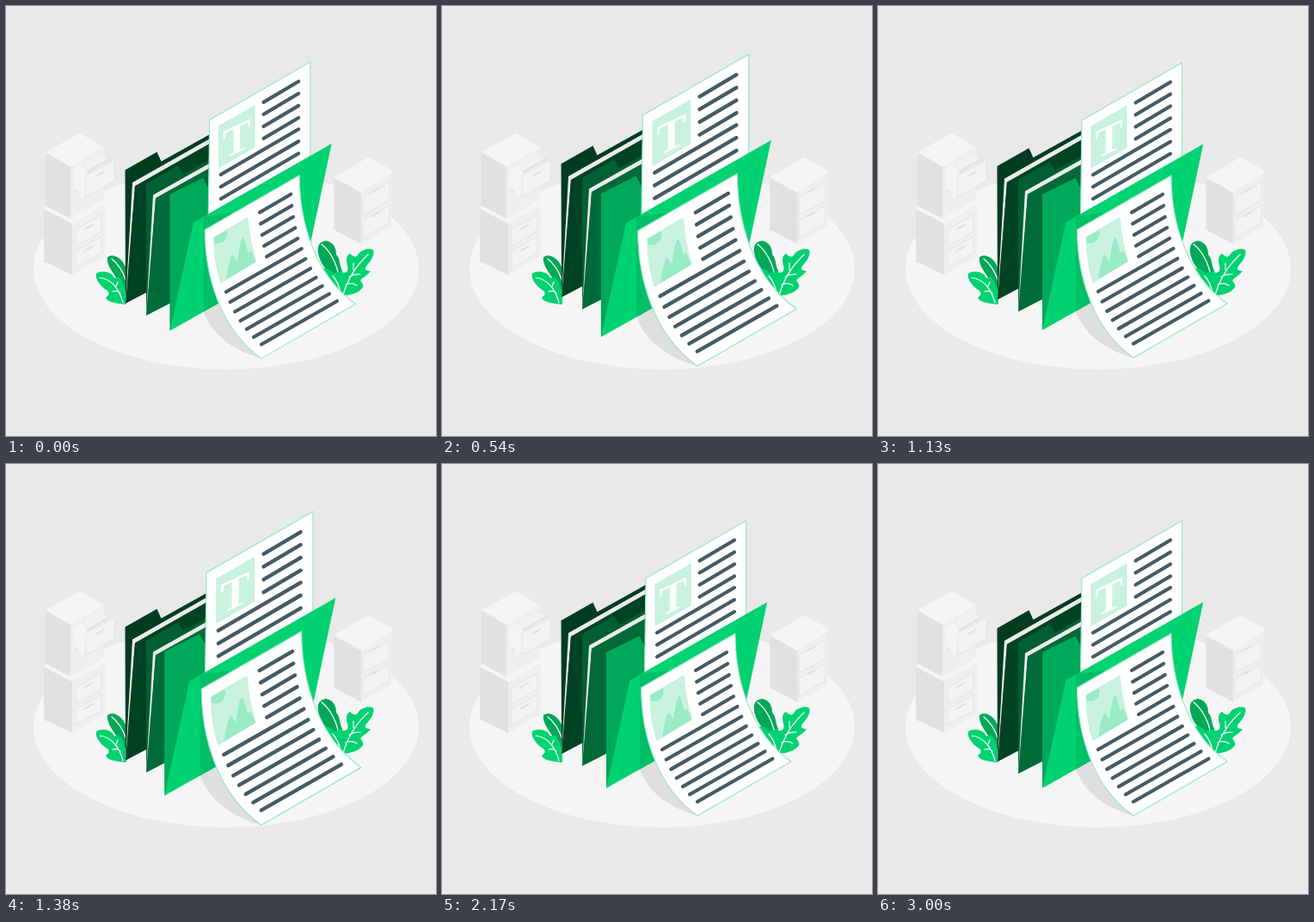
Write an HTML page that moves like this. It is 500 px wide and 500 px high and loops after 3.04 s.

```html
<!DOCTYPE html>
<html lang="en">
<head>
<meta charset="utf-8">
<title>Folders and documents</title>
<style>
  html, body { margin: 0; width: 100%; height: 100%; overflow: hidden; background: #e9e9e9; }
  svg { display: block; width: 100%; height: 100%; }
  .vein { fill: none; stroke: #fff; stroke-width: 1.2; stroke-linecap: round; }
  .rule { stroke: #455a64; stroke-width: 4.1; stroke-linecap: round; }
  .sheet { fill: #fff; stroke: #93e8c2; stroke-width: 1.1; stroke-linejoin: round; }
  .mint { fill: #caf3df; stroke: #a9ecce; stroke-width: .6; }
  .top { fill: #f4f4f4; }
  .side { fill: #e1e1e1; }
  .face { fill: #eeeeee; }
  .drawer { fill: #f2f2f2; stroke: #e3e3e3; stroke-width: 1; }
  .handle { stroke: #dedede; stroke-width: 2; }
  .glyph { font: bold 49px "Liberation Serif", "Noto Serif", serif; fill: #fff; text-anchor: middle; }
</style>
</head>
<body>
<svg viewBox="0 0 500 500">
  <rect width="500" height="500" fill="#e9e9e9"/>
  <ellipse cx="256" cy="305.5" rx="224" ry="117" fill="#f5f5f5"/>

  <g id="cabinets">
    <path class="side" d="M44 236L77 253V313L44 297Z"/>
    <path class="face" d="M77 253L115 231V291L77 313Z"/>
    <path class="top" d="M44 236L46 231L75 247L114 225L115 231L77 253Z"/>
    <path class="drawer" d="M81 260L111 243V262L81 279ZM81 285L111 268V287L81 304Z"/>
    <path class="handle" d="M91 260L101 254M91 285L101 279"/>
    <path class="side" d="M46 170L75 187V247L46 232Z"/>
    <path class="face" d="M75 187L114 164V225L75 247Z"/>
    <path class="top" d="M46 170L86 148L114 164L75 187Z"/>
    <path class="side" d="M79 192L110 174V184L93 194V222L79 214Z"/>
    <path d="M78 191L93 181V219L87 224L84 215L78 212Z" fill="#f3f3f3"/>
    <path class="side" d="M89 184L112 171L123 178L96 194Z"/>
    <path d="M90 183L111 171L120 177L94 192Z" fill="#f0f0f0"/>
    <path class="drawer" d="M93 197L126 179V203L93 222Z"/>
    <path class="handle" d="M105 198L115 192"/>

    <path class="side" d="M381 200L413 217V277L381 260Z"/>
    <path class="face" d="M413 217L448 195V257L413 277Z"/>
    <path class="top" d="M381 199L421 176L449 191L448 195L413 217Z"/>
    <path class="drawer" d="M415 222L446 205V226L415 243ZM415 249L446 232V252L415 270Z"/>
    <path class="handle" d="M425 217L434 212M425 245L434 240"/>
  </g>

  <g id="plants">
    <path fill="#00a859" d="M140 334C128 314 116 302 118 292C126 287 136 294 140 306Z"/>
    <path class="vein" d="M123 294Q134 303 139 318"/>
    <path fill="#00d272" d="M139 347C128 346 117 344 116 339C122 335 120 332 115 329C108 324 103 315 105 311C111 307 120 309 124 313C125 317 128 317 131 315C136 319 140 330 140 346Z"/>
    <path class="vein" d="M109 316C122 317 132 329 136 345M128 326L130 321M124 332Q130 330 133 334"/>
    <path fill="#00a859" d="M389 320C381 316 367 304 364 291C361 281 363 274 372 273C381 274 384 282 384 289C389 294 387 300 391 308Z"/>
    <path class="vein" d="M367 277Q383 290 388 318"/>
    <path fill="#00d272" d="M366 306C372 303 378 307 381 311C385 308 388 309 390 312L390 335L376 325Z"/>
    <path fill="#00d272" d="M385 334C383 322 384 315 389 308C395 313 399 308 397 302C395 294 396 290 400 288C404 292 408 293 410 288C414 283 424 281 427 284C429 288 425 296 420 301C416 306 418 308 424 308C420 314 414 316 412 319C414 322 416 324 415 327C410 335 396 337 388 337Z"/>
    <path class="vein" d="M421 289C409 300 398 315 392 336M404 307V299M399 315Q405 311 412 312M395 324Q402 321 408 325M380 314Q387 322 389 334"/>
  </g>

  <g id="backFolders">
    <path fill="#003c20" d="M138.500 191L175.500 170L180.500 181L245 145V290L139 346Z"/>
    <path fill="#ebebeb" d="M139 346L147 205.500L245 150V163L150 210L140 343Z"/>
    <path fill="#004224" d="M139 346L150 209.500L245 155.500V290Z"/>
    <path fill="#005f32" d="M163 207L200 185.500L206 196L245 174V318L163 360Z"/>
    <path fill="#ebebeb" d="M163 360L171 220L245 178.500V191L174 224L164.500 357Z"/>
    <path fill="#006a38" d="M163 360L174 223.500L245 184V318Z"/>
  </g>

  <g id="paperwork">
    <path d="M228 348C236 380 264 400 297 409L254 340Z" fill="#dfdfdf"/>
    <path fill="#00a85a" d="M191 219L229.500 200L235.500 211.500L270 192V331L191 376Z"/>
    <path class="sheet" d="M237 133L353.500 66V225L235 285Z"/>
    <path class="mint" d="M248 140L289 116.500V164.500L248 188Z"/>
    <text class="glyph" transform="matrix(1 -.47 0 1 268.500 171)">T</text>
    <g id="backRules"></g>
    <path fill="#00d272" d="M191 377L218.500 251.500L378.200 160.500L351.500 286.500Z"/>
    <path fill="#00bf67" d="M230 245V355L262 337V240Z"/>
    <path class="sheet" d="M231.500 260L341 197C341 250 358 312 406 346L297 409C249 375 231.500 313 231.500 260Z"/>
    <path class="mint" d="M242 269L281 246Q283 272 290.500 297L250 321.500Q242 296 242 269Z"/>
    <path fill="#98ebc5" d="M242 269L257 260.200C260 270 253 278 243 275.500ZM256.500 317.500C258 303 261 291 264 289L269 297C271 284 273 271 275.500 269C279 272 280 283 282 287L285 284L290.500 297Z"/>
    <g id="frontRules"></g>
  </g>
</svg>

<script>
  const LOOP = 3040, CYCLE = 3000, FLOAT = 1500, STEP = 1000 / 24, LEAD = 15;
  const PULSE = [[0, 0], [300, 1], [900, 0], [1200, 0], [1500, 1], [1800, 0], [3000, 0]];
  const byId = id => document.getElementById(id);
  const paperwork = byId("paperwork"), backFolders = byId("backFolders");

  const rule = (x, y, w, h) =>
    `<line class="rule" x1="${x}" y1="${y}" x2="${x + w}" y2="${y - h}"/>`;
  const rules = (n, make) => Array.from({ length: n }, (_, i) => make(i)).join("");

  byId("backRules").innerHTML =
    rules(4, i => rule(299.5, 112.5 + 14 * i, 40.5, 24)) +
    rules(4, i => rule(250, 196.3 + 14 * i, 90, 52.5));
  byId("frontRules").innerHTML =
    rules(5, i => rule(295 + .8 * i + .3 * i * i, 240 + 13.4 * i - .15 * i * i, 36, 21)) +
    rules(7, i => rule(256 + 4.3 * i + .42 * i * i, 332 + 12.1 * i - .33 * i * i, 87.5, 50));

  function track(keys, t) {
    const n = keys.findIndex(k => k[0] >= t);
    if (n < 1) return keys[0][1];
    const [t0, a] = keys[n - 1], [t1, b] = keys[n];
    return a + (b - a) * (t - t0) / (t1 - t0);
  }

  function draw(t) {
    // 24 poses per second
    const time = Math.min(Math.floor((t + 5) / STEP) * STEP + LEAD, CYCLE);
    const scale = 1 + .1 * track(PULSE, time);
    const lift = 10 * (1 - Math.abs(time % FLOAT / (FLOAT / 2) - 1));
    paperwork.setAttribute("transform",
      `translate(298.5 237.5) scale(${scale}) translate(-298.5 -237.5)`);
    backFolders.setAttribute("transform", `translate(0 ${-lift})`);
  }

  const start = performance.now();
  function tick() {
    draw((performance.now() - start) % LOOP);
    requestAnimationFrame(tick);
  }
  tick();
</script>
</body>
</html>
```
